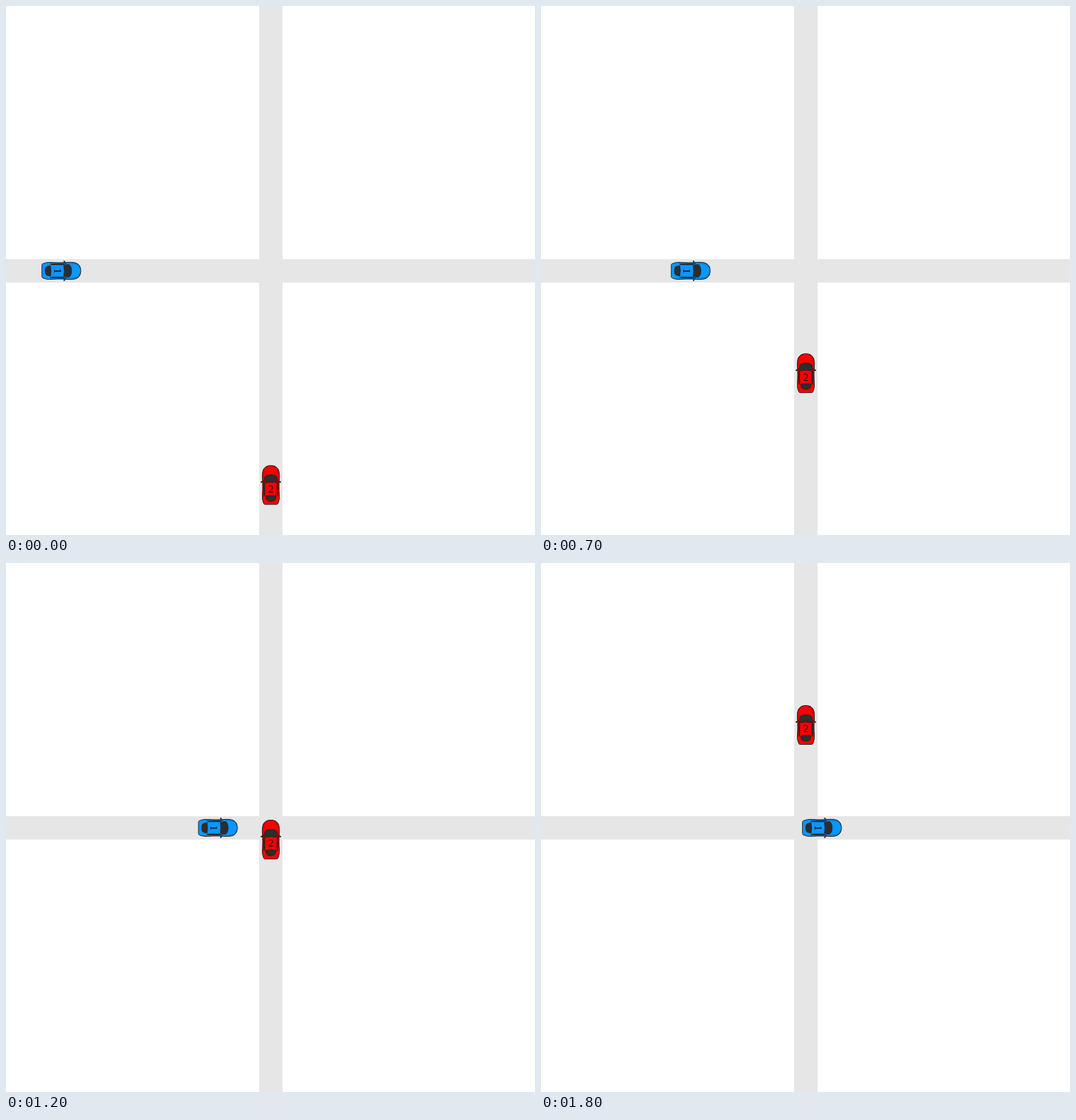
Write an HTML page that moves like this. It is 748 px wide and 748 px high and loops after 1900 ms.

```html
<!DOCTYPE html>
<html lang="en">
<head>
<meta charset="utf-8">
<title>Crossing cars</title>
<style>
  html, body { margin: 0; width: 100%; height: 100%; overflow: hidden; background: #fff; }
  svg { display: block; width: 100vw; height: 100vh; }
  text { font: 15.5px "Liberation Serif", serif; text-anchor: middle; }
</style>
</head>
<body>
<svg viewBox="0 0 748 748">
  <defs>
    <!-- Car pointing up, nose at the origin -->
    <g id="car">
      <path d="M-12 22.5L-14 23.4V24.4L-11.5 23.8M12 22.5L14 23.4V24.4L11.5 23.8" stroke="#111" stroke-width=".8"/>
      <path d="M0 .4C6 .4 9 3 10.8 6.5C12.2 10 12.3 14 12 20C11.4 27 11.4 34 12 42C12.3 47 11.5 51 10 54.4Q9.5 55.4 8 55.4H-8Q-9.5 55.4-10 54.4C-11.5 51-12.3 47-12 42C-11.4 34-11.4 27-12 20C-12.3 14-12.2 10-10.8 6.5C-9 3-6 .4 0 .4Z" stroke="#111" stroke-width=".9"/>
      <path d="M-11 7Q-8 2.5-4 1.7M11 7Q8 2.5 4 1.7M-10.6 18Q-10-1-4 2M10.6 18Q10-1 4 2" fill="none" stroke="#111" stroke-width=".5" opacity=".55"/>
      <g fill="#2d2d2d" stroke="#111" stroke-width=".5">
        <path d="M-9.2 17.5Q-7 13.4 0 13.4T9.2 17.5L7.6 24.6Q0 23-7.6 24.6Z"/>
        <path d="M-7.6 43.2Q0 41.8 7.6 43.2L6.2 48.5Q4.5 51 0 51T-6.2 48.5Z"/>
        <path d="M-10.2 20L-8.6 26V41L-9.8 44Q-10.6 32-10.2 20ZM10.2 20L8.6 26V41L9.8 44Q10.6 32 10.2 20Z"/>
      </g>
    </g>
  </defs>
  <path d="M358 0h33v748h-33zM0 358h748v33H0z" fill="#e6e6e6"/>
  <g id="blue" fill="#0c96ff"><use href="#car"/><text y="38.3" fill="#000">1</text></g>
  <g id="red" fill="#f80000"><use href="#car"/><text y="38.3" fill="#000">2</text></g>
</svg>
<script>
const STEP = 100, STEPS = 19, LANE = 374.5;
const blue = document.getElementById("blue");
const red = document.getElementById("red");

// The blue car brakes steadily
const blueTravel = n => 19.9 * n - 0.121 * n * n;

// The red car accelerates, then holds its top speed
function redTravel(n) {
  const rise = Math.min(n, 12);
  return 20.8 * rise + 0.51 * rise * rise / 2 + 27 * (n - rise);
}

function draw(now) {
  const n = Math.floor(now / STEP) % STEPS;
  blue.setAttribute("transform", `translate(${106.2 + blueTravel(n)} ${LANE}) rotate(90)`);
  red.setAttribute("transform", `translate(${LANE} ${649.4 - redTravel(n)})`);
  requestAnimationFrame(draw);
}
draw(performance.now());
</script>
</body>
</html>
```
